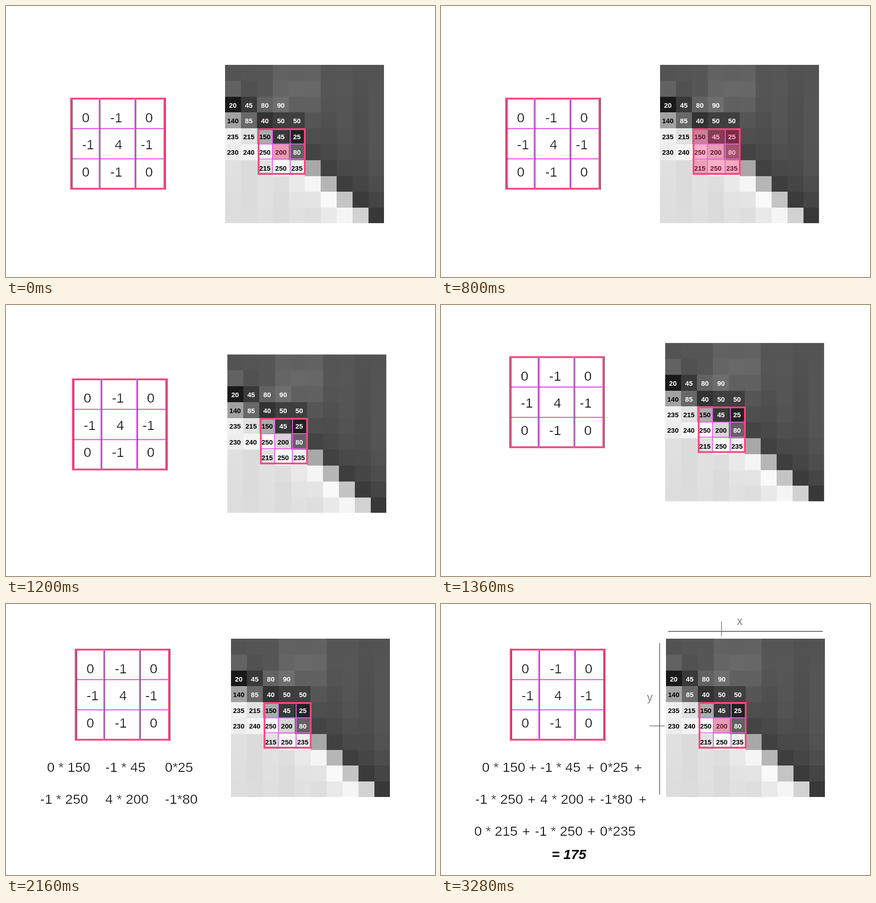
These frames come from a looping animation (942x594 px, 3360 ms). An HTML page:

```html
<!DOCTYPE html>
<html lang="en">
<head>
<meta charset="utf-8">
<title>Convolution step</title>
<style>
  html, body { margin: 0; width: 100%; height: 100%; overflow: hidden; background: #fff; }
  #stage { display: block; width: 942px; height: 594px; }
  text { font: 30px "Liberation Sans", Arial, sans-serif; white-space: pre; }
  /* the white outline slims the letters */
  .thin { fill: #000; stroke: #fff; stroke-width: .6px; }
  .mid, .num, .axis { text-anchor: middle; }
  .num { font-size: 15px; font-weight: bold; }
  .sum { font-style: italic; font-weight: bold; }
  .axis { font-size: 25px; fill: #666; stroke: #fff; stroke-width: .4px; }
</style>
</head>
<body>
<svg id="stage" viewBox="0 0 942 594"></svg>
<script>
const LOOP = 3360, STEP = 80;
const PINK = '#f9467f', VIOLET = '#e563e8', DARK = '#3a1c38', BLUE = '#0b3ef5', GREY = '#6e6e6e';
const KERNEL = [[0, -1, 0], [-1, 4, -1], [0, -1, 0]];
// Known pixel values, from the third image row down
const KNOWN = [[20, 45, 80, 90], [140, 85, 40, 50, 50], [235, 215, 150, 45, 25],
  [230, 240, 250, 200, 80], [, , 215, 250, 235]];
const TOP = 2, WIN_ROW = 4, WIN_COL = 2;

const stage = document.getElementById('stage');

function add(parent, tag, attrs, content) {
  const el = document.createElementNS('http://www.w3.org/2000/svg', tag);
  for (const key in attrs) el.setAttribute(key, attrs[key]);
  if (content !== undefined) el.textContent = content;
  parent.appendChild(el);
  return el;
}
const group = () => add(stage, 'g', {});
const path = (parent, d, stroke, width) =>
  add(parent, 'path', { d, stroke, 'stroke-width': width, fill: 'none' });
const label = (parent, cls, x, y, content, fill) =>
  add(parent, 'text', fill ? { class: cls, x, y, fill } : { class: cls, x, y }, content);
const fade = (el, alpha) => el.setAttribute('opacity', +alpha);
const move = (el, x, y) => el.setAttribute('transform', `translate(${x} ${y})`);

// Image: a dark field above a light one, split by a diagonal edge
const noise = (r, c) => Math.sin(r * 12.9 + c * 78.2) * 3;
function shade(r, c) {
  const known = KNOWN[r - TOP]?.[c];
  if (known) return known + 22 * Math.sin(Math.PI * known / 255);
  const side = c - (r - 1);
  if (side === 0) return 168 + 14 * (r - 6);
  if (side < 0) return 221 + 70 * Math.exp(side) + noise(r, c);
  const glow = 24 * Math.exp(-((c - 4) ** 2 + (r - 1) ** 2) / 3);
  return 83 - 5 * r * Math.exp(-side / 2) + glow + noise(r, c);
}
const image = group();
const bitmap = add(image, 'svg', {
  x: 494, y: 76, width: 349, height: 347, 'shape-rendering': 'crispEdges'
});
for (let r = 0; r < 10; r++) {
  for (let c = 0; c < 10; c++) {
    const v = Math.round(shade(r, c));
    add(bitmap, 'rect', { x: c * 35, y: r * 34.8, width: 35, height: 34.8, fill: `rgb(${v},${v},${v})` });
  }
}
const valueX = c => 511 + 35.2 * c;
const valueY = r => 164.5 + 34.4 * (r - TOP);
KNOWN.forEach((row, i) => row.forEach((v, c) =>
  label(image, 'num', valueX(c), valueY(i + TOP) + 5.5, v, v < 100 ? '#fff' : '#000')));

const tint = (x, y, width, height) =>
  add(image, 'rect', { x, y, width, height, fill: '#ff4081', opacity: 0 });
const tintAll = tint(567, 217, 102, 98);
const tintMid = tint(599, 250, 37, 32);
path(image, 'M598 218V315M637 218V315M568 249.5H669M568 282.5H669', VIOLET, 2);
path(image, 'M567.5 217H669V315H567.5Z', PINK, 3.8);

// Kernel
const kernel = group();
path(kernel, 'M153 100H358V297.5H153Z', PINK, 4);
path(kernel, 'M155 165.7H356M155 232H356', VIOLET, 2.6);
path(kernel, 'M215 98V300M293.5 98V300', VIOLET, 3);
path(kernel, 'M155.5 102V296M216.8 102V296M295.3 102V296M360.3 98V300', DARK, 1);
const weightX = (r, c) => {
  const lean = r === 1 ? 2.5 : -2.5;
  return 254.5 + 67 * (c - 1) + (c < 2 ? lean : -lean);
};
const weightY = r => 141 + 59.5 * r;

function arrow(x1, y1, x2, y2) {
  const g = group();
  const len = Math.hypot(x2 - x1, y2 - y1);
  const angle = Math.atan2(y2 - y1, x2 - x1) * 180 / Math.PI;
  g.setAttribute('transform', `translate(${x1} ${y1}) rotate(${angle})`);
  path(g, `M0 0H${len - 8}`, BLUE, 2.4);
  add(g, 'path', { d: `M${len} 0l-10 -5v10z`, fill: BLUE });
  return g;
}

// One product per weight, with a plus sign in each gap
const LEFT = [[90, 218, 349], [75, 218, 349], [73, 206, 349]];
const terms = [];
const pluses = group();
let sum = 0;
KERNEL.forEach((row, r) => row.forEach((w, c) => {
  const value = KNOWN[WIN_ROW - TOP + r][WIN_COL + c];
  const x = LEFT[r][c], y = 367.5 + 70 * r;
  const text = label(stage, 'thin', x, y, [w, value].join(c < 2 ? ' * ' : '*'));
  label(kernel, 'thin mid', weightX(r, c), weightY(r) + 10.5, w);
  terms.push({
    text,
    start: 1520 + 400 * r + 80 * c,
    arrow: arrow(weightX(r, c) + 15, weightY(r) + 2,
      valueX(WIN_COL + c) - 9, valueY(WIN_ROW + r) - 6.5)
  });
  const end = x + text.getComputedTextLength();
  const plusX = c < 2 ? (end + LEFT[r][c + 1]) / 2 : end + 22;
  if (r < 2 || c < 2) label(pluses, 'thin mid', plusX, y + 1, '+');
  sum += w * value;
}));
const total = label(stage, 'sum', 243, 559, `= ${sum}`);

// Axes
const axes = group();
path(axes, 'M499 60H838.5M480 86V417.5', GREY, 1.8);
label(axes, 'axis', 656, 46, 'x');
label(axes, 'axis', 458.5, 213, 'y');
const ticks = group();
path(ticks, 'M616 38V70.5M458 267.3H491', GREY, 1.4);

const ramp = (t, from, to) => Math.min(1, Math.max(0, (t - from) / (to - from)));
const ease = p => p < .5 ? 4 * p ** 3 : 1 - 4 * (1 - p) ** 3;

function draw(t) {
  const left = 1 - ease(ramp(t, 858, 1602));
  move(image, -13 * left, 53 * left);
  move(kernel, -10 * left, 103 * left);

  fade(tintMid, t < 640 || t >= 2960 ? .4 : 0);
  fade(tintAll, .4 * (ramp(t, 560, 800) - ramp(t, 960, 1120)));

  for (const { text, arrow, start } of terms) {
    fade(text, t >= start);
    fade(arrow, t >= start && t < start + STEP);
  }
  fade(pluses, t >= 2640);
  fade(total, t >= 2720);
  fade(axes, t >= 2880);
  fade(ticks, t >= 2960);
}

function frame() {
  const t = performance.now() % LOOP;
  draw(Math.floor(t / STEP) * STEP);
  requestAnimationFrame(frame);
}
frame();
</script>
</body>
</html>
```
